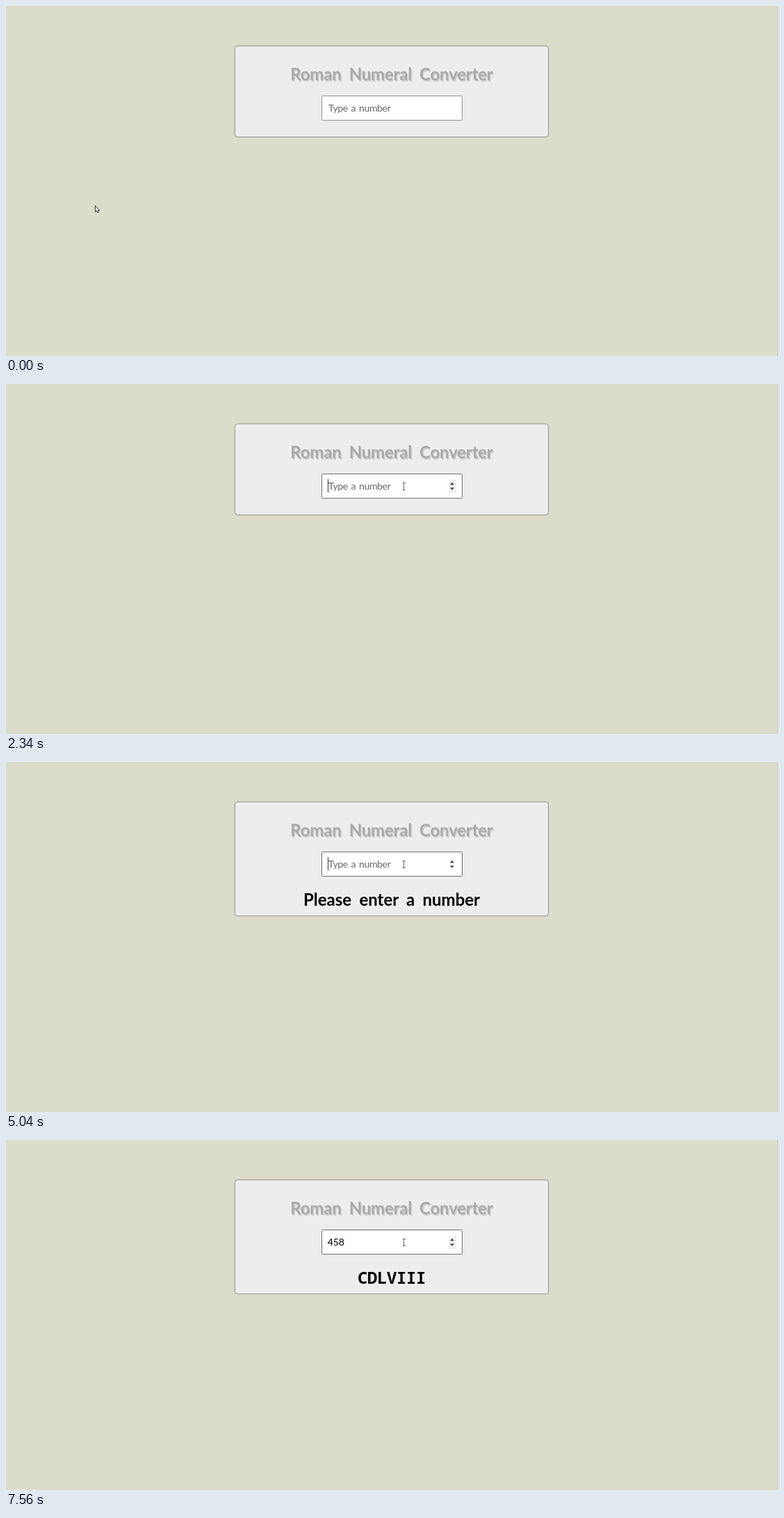
Recreate the animation shown at these times as an HTML page. Size 1111 by 504 pixels, loop 8000 ms.

```html
<!DOCTYPE html>
<html lang="en">
<head>
<meta charset="utf-8">
<title>Roman Numeral Converter</title>
<style>
  html, body { margin: 0; width: 100%; height: 100%; overflow: hidden; background: #dcdcca; }
  svg { display: block; width: 100%; height: 100%; }
  text { font-family: Lato, "Open Sans", sans-serif; white-space: pre; }
  .head { font-size: 24px; font-weight: 700; text-anchor: middle; word-spacing: 5.5px; }
  .title { letter-spacing: -0.2px; }
  .numeral { font-family: "Noto Sans Mono", "DejaVu Sans Mono", monospace; letter-spacing: -0.4px; }
  .hint { font-size: 14.2px; letter-spacing: -0.45px; word-spacing: 1.6px; fill: #686868; }
  .value { font-size: 14.2px; letter-spacing: -0.2px; fill: #000; }
  .ones { font-weight: 700; letter-spacing: -2.2px; }
</style>
</head>
<body>
<svg viewBox="0 0 1111 504">
  <defs>
    <filter id="blur" x="-5%" y="-10%" width="110%" height="120%">
      <feGaussianBlur stdDeviation="1.2"/>
    </filter>
  </defs>
  <rect width="1111" height="504" fill="#dcdcca"/>
  <rect x="1110" width="1" height="504" fill="#c3c5c2"/>

  <rect id="shade" x="329.5" y="57.5" width="451" fill="#80807a" opacity=".5" rx="4" filter="url(#blur)"/>
  <rect id="card" x="329.5" y="57.5" width="451" rx="4" fill="#ededed" stroke="#9b9b94"/>
  <text class="head title" x="556.5" y="108.5" fill="#cecece">Roman Numeral Converter</text>
  <text class="head title" x="555" y="107" fill="#a9a9a9">Roman Numeral Converter</text>

  <rect id="field" x="454.5" y="129.5" width="202" height="35" rx="1" fill="#fff"/>
  <text id="hint" class="hint" x="463.7" y="152">Type a number</text>
  <text id="value" y="152"></text>
  <rect id="caret" y="137" width="1" height="19" fill="#333"/>
  <g id="spinner">
    <rect id="spinBack" x="637" y="138" width="11" height="19" fill="#efefef"/>
    <path d="M639 145.2L642 141.6L645 145.2ZM639 149.2L642 152.8L645 149.2Z" fill="#484848"/>
  </g>
  <text id="result" x="555" y="207"></text>

  <path id="arrow" d="M.5 .5V9.5L2.5 7.7L3.9 10.7L5.3 10.1L4 7.2H6.6Z" fill="#fff" stroke="#222" stroke-width=".9"/>
  <path id="beam" d="M-2 -4.5H2M-.5 -4.5V5.5M-2 5.5H2" fill="none" stroke="#666"/>
</svg>
<script>
  const LOOP = 8000;
  const el = id => document.getElementById(id);
  const show = (id, on) => el(id).setAttribute("visibility", on ? "visible" : "hidden");
  const set = (id, attrs) => {
    for (const key in attrs) el(id).setAttribute(key, attrs[key]);
  };

  const start = {
    arrow: [128, 287], beam: null, border: "#8f8f8f", hover: false, spinBack: true,
    caret: 463, caretOn: false, value: "", touched: false
  };

  // Each event changes part of the state from its time on.
  const events = [
    [500, { arrow: [295, 284] }],
    [620, { arrow: [515, 260] }],
    [770, { arrow: null, beam: [570, 158], hover: true }],
    [890, { beam: [573, 153] }],
    [1040, { beam: [573, 147] }],
    [1320, { caretOn: true, border: "#9c9c9c" }],
    [1440, { border: "#6e6e6e" }],
    [1840, { caretOn: false }],
    [2340, { caretOn: true }],
    [2620, { value: "1", caret: 468, touched: true }],
    [3180, { caretOn: false }],
    [3730, { caretOn: true }],
    [3880, { value: "11", caret: 474 }],
    [4380, { caretOn: false }],
    [4790, { value: "1", caret: 468, caretOn: true }],
    [4910, { value: "", caret: 463 }],
    [5040, { spinBack: false }],
    [5420, { caretOn: false }],
    [6040, { caretOn: true }],
    [6290, { value: "4", caret: 470, spinBack: true }],
    [6660, { value: "45", caret: 478 }],
    [7030, { value: "458", caret: 486 }],
    [7560, { caretOn: false }]
  ];

  const numerals = [[400, "CD"], [100, "C"], [90, "XC"], [50, "L"], [40, "XL"],
    [10, "X"], [9, "IX"], [5, "V"], [4, "IV"], [1, "I"]];

  function toRoman(n) {
    let out = "";
    for (const [size, letters] of numerals) {
      while (n >= size) { out += letters; n -= size; }
    }
    return out;
  }

  function placePointer(id, at) {
    show(id, at);
    if (at) set(id, { transform: `translate(${at})` });
  }

  function render(time) {
    const s = { ...start };
    for (const [at, change] of events) if (time >= at) Object.assign(s, change);

    const height = s.touched ? 164 : 131;
    set("card", { height });
    set("shade", { height });
    set("field", { stroke: s.border });
    show("hint", !s.value);
    show("spinner", s.hover);
    set("spinBack", { opacity: s.spinBack ? 1 : 0 });

    const ones = s.value[0] === "1";
    set("value", { class: ones ? "value ones" : "value", x: ones ? 461.7 : 462.7 });
    el("value").textContent = s.value;
    show("caret", s.caretOn);
    set("caret", { x: s.caret });

    set("result", { class: s.value ? "head numeral" : "head" });
    el("result").textContent = s.value ? toRoman(+s.value) : s.touched ? "Please enter a number" : "";

    placePointer("arrow", s.arrow);
    placePointer("beam", s.beam);
  }

  const began = performance.now();
  function tick() {
    render((performance.now() - began) % LOOP);
    requestAnimationFrame(tick);
  }
  tick();
</script>
</body>
</html>
```
